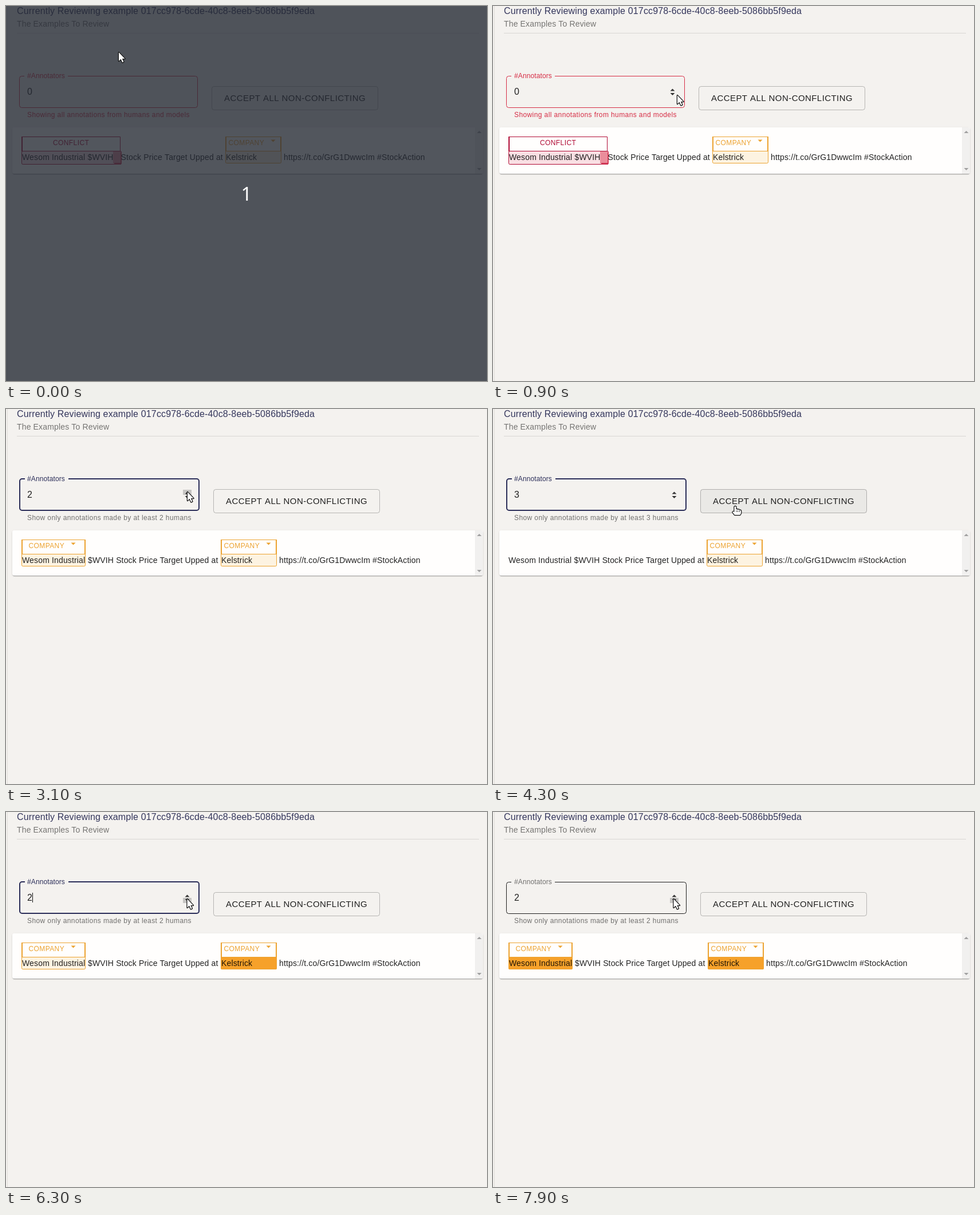
These frames come from a looping animation (840 by 655 pixels, 8000 ms). An HTML page with a canvas:

```html
<!DOCTYPE html>
<html lang="en">
<head>
<meta charset="utf-8">
<title>Annotation review</title>
<style>
html, body { margin: 0; width: 100%; height: 100%; overflow: hidden; background: #f4f2ef; }
canvas { display: block; }
</style>
</head>
<body>
<canvas id="stage" width="840" height="655"></canvas>
<script>
const ctx = document.getElementById('stage').getContext('2d');
const LOOP = 8000, STEP = 100;
const SANS = '"Liberation Sans", Arial, sans-serif';
const INK = 'rgba(0,0,0,.87)', GREY = 'rgba(0,0,0,.54)', LINE = 'rgba(0,0,0,.25)';
const RED = '#d62d45', CRIMSON = '#b00a34', NAVY = '#2b2e59', ORANGE = '#eca22f';

// time, x, y of the pointer tip
const PATH = [
  [0, 196, 80], [100, 196, 80], [900, 321, 155], [1100, 315, 150], [1300, 315, 150],
  [1500, 313, 147], [2100, 313, 147], [2300, 316, 144], [4200, 316, 144],
  [4300, 423, 169], [4400, 423, 169], [4500, 463, 165], [4600, 459, 163],
  [5100, 459, 163], [5600, 322, 155], [5700, 322, 155], [5800, 315.5, 151],
  [6400, 315.5, 151], [6800, 452, 166], [7300, 452, 166], [7900, 314.5, 151]
];
const CARETS = [1700, 2600, 3600, 6300];
const CLICKS = [4700, 6800];

const within = (v, a, b) => v >= a && v < b;
const easeOut = p => 1 - Math.pow(1 - p, 2.6);
const smooth = p => p * p * (3 - 2 * p);

function pointerAt(t) {
  let i = 0;
  while (i < PATH.length - 1 && PATH[i + 1][0] <= t) i++;
  const [t0, x0, y0] = PATH[i], [t1, x1, y1] = PATH[i + 1] || PATH[i];
  const p = t1 > t0 ? smooth((t - t0) / (t1 - t0)) : 0;
  return { x: x0 + (x1 - x0) * p, y: y0 + (y1 - y0) * p };
}

function sceneAt(t) {
  const value = t < 1800 ? 0 : t < 2600 ? 1 : t < 3600 ? 2 : t < 6300 ? 3 : 2;
  const right = value ? 338 : 335;
  const p = pointerAt(t);
  return {
    t, value, right, p,
    focus: within(t, 1700, 4800) || within(t, 6300, 6900),
    overInput: within(p.x, 23, right) && within(p.y, 122, 178),
    overButton: within(p.x, right + 24, right + 315) && within(p.y, 140, 182),
    caret: CARETS.some(c => within(t, c, c + 500)),
    spin: within(t, 1500, 4300) ? 'up' : within(t, 5800, 6500) || t >= 7800 ? 'down' : '',
    acceptedSecond: t >= 5100,
    acceptedFirst: t >= 7200
  };
}

function text(str, x, y, size, color, spacing = 0.15) {
  ctx.font = `${size}px ${SANS}`;
  ctx.letterSpacing = spacing + 'px';
  ctx.fillStyle = color;
  ctx.fillText(str, x, y);
}

function rect(x0, y0, x1, y1, color) {
  ctx.fillStyle = color;
  ctx.fillRect(x0, y0, x1 - x0, y1 - y0);
}

function roundPath(x0, y0, x1, y1, r) {
  ctx.beginPath();
  ctx.roundRect(x0, y0, x1 - x0, y1 - y0, r);
}

function outline(x0, y0, x1, y1, r, w, color) {
  roundPath(x0 + w / 2, y0 + w / 2, x1 - w / 2, y1 - w / 2, r);
  ctx.lineWidth = w;
  ctx.strokeStyle = color;
  ctx.stroke();
}

function triangle(cx, y, half, h, color) {
  ctx.beginPath();
  ctx.moveTo(cx - half, y);
  ctx.lineTo(cx + half, y);
  ctx.lineTo(cx, y + h);
  ctx.fillStyle = color;
  ctx.fill();
}

function header() {
  rect(0, 0, 840, 655, '#f4f2ef');
  rect(2, 0, 3, 655, '#e0deda');
  text('Currently Reviewing example 017cc978-6cde-40c8-8eeb-5086bb5f9eda', 19, 14, 16, '#34365c');
  text('The Examples To Review', 19, 36, 14, '#757472');
  rect(19, 47, 826, 48, '#d8d6d3');
}

function field(s) {
  const error = s.value === 0;
  const accent = error ? RED : s.focus ? NAVY : GREY;
  const border = error || s.focus ? accent : s.overInput ? INK : LINE;
  const w = s.focus ? 2 : 1;

  // the outline leaves a gap for the label
  ctx.save();
  ctx.beginPath();
  ctx.rect(0, 100, 840, 100);
  ctx.rect(31 + w, 118, 76, 8);
  ctx.clip('evenodd');
  outline(23, 123 - w, s.right, 178, 4, w, border);
  ctx.restore();

  text('#Annotators', 37, 126, 12, accent, 0.11);
  text(String(s.value), 37, 155, 16, INK);
  if (s.caret) rect(46, 141, 47, 158, '#111');
  if (s.overInput || s.focus) spinner(s.right - 29, s.spin);

  const help = error ? 'Showing all annotations from humans and models'
    : `Show only annotations made by at least ${s.value} humans`;
  text(help, 37, 194, 12, error ? RED : GREY, 0.4);
}

function spinner(x, lit) {
  if (lit === 'up') rect(x, 141, x + 15, 150, '#c6c5c3');
  if (lit === 'down') rect(x, 150, x + 15, 159, '#c6c5c3');
  triangle(x + 7.5, 148.5, 4, -4, '#333');
  triangle(x + 7.5, 152, 4, 4, '#333');
}

function button(s) {
  const x = s.right + 24;
  ctx.save();
  roundPath(x, 140, x + 291, 182, 4);
  ctx.clip();
  if (s.overButton) rect(x, 140, x + 291, 182, 'rgba(0,0,0,.04)');
  for (const c of CLICKS) ripple(s.t - c, pointerAt(c + 100));
  ctx.restore();
  outline(x, 140, x + 291, 182, 4, 1, LINE);
  text('ACCEPT ALL NON-CONFLICTING', x + 22, 166, 15, INK, 0.43);
}

function ripple(age, at) {
  if (!within(age, 100, 650)) return;
  const grow = easeOut(Math.min(age / 550, 1));
  const fade = Math.pow(1 - (age - 100) / 550, 1.8);
  ctx.fillStyle = `rgba(0,0,0,${(0.1 + 0.2 * grow) * 0.87 * fade})`;
  ctx.beginPath();
  ctx.arc(at.x, at.y, 196 * grow, 0, Math.PI * 2);
  ctx.fill();
}

function shadowed(x0, y0, x1, y1, dy, blur, alpha) {
  ctx.save();
  ctx.shadowColor = `rgba(0,0,0,${alpha})`;
  ctx.shadowOffsetY = dy;
  ctx.shadowBlur = blur;
  roundPath(x0, y0, x1, y1, 4);
  ctx.fillStyle = '#fff';
  ctx.fill();
  ctx.restore();
}

function card(bottom) {
  shadowed(11, 212, 833, bottom, 1, 3, 0.12);
  shadowed(11, 212, 833, bottom, 1, 1, 0.14);
  shadowed(12, 213, 832, bottom - 1, 2, 1, 0.2);
  roundPath(11, 212, 833, bottom, 4);
  ctx.fillStyle = '#fffefd';
  ctx.fill();
  rect(13, bottom, 831, bottom + 1, '#a3a2a1');
  roundPath(819, 212, 833, bottom, [0, 4, 4, 0]);
  ctx.fillStyle = '#f1f0ef';
  ctx.fill();
  triangle(826.5, 222, 4, -4, '#a0a0a0');
  triangle(826.5, bottom - 10, 4, 4, '#a0a0a0');
}

function companyTag(x0, x1, name, accepted) {
  const mid = (x0 + x1) / 2;
  roundPath(x0, 253, x1, 275, [0, 0, 2, 2]);
  ctx.fillStyle = accepted ? '#f6a12a' : '#fdf3e1';
  ctx.fill();
  outline(x0, 253, x1, 275, [0, 0, 2, 2], 1, ORANGE);
  rect(x0, 228, x1, 229, ORANGE);
  rect(x0, 228, x0 + 2, 254, ORANGE);
  rect(x1 - 2, 228, x1, 254, ORANGE);
  text('COMPANY', mid - 43.5, 243, 12, ORANGE, 0.4);
  triangle(mid + 34.5, 233.5, 4, 4, ORANGE);
  text(name, x0 + 1, 269, 14, INK);
}

function conflictTag() {
  roundPath(27, 253, 201, 277, 2);
  ctx.fillStyle = '#f9dfe3';
  ctx.fill();
  rect(187, 254, 201, 275, '#ea8d9b');
  outline(27, 253, 202, 277, 2, 1, CRIMSON);
  rect(189, 274, 201, 277, '#cf3453');
  rect(200, 256, 202, 275, '#d8405c');
  outline(27, 228, 200, 254, 0, 1, CRIMSON);
  rect(27, 228, 29, 254, CRIMSON);
  text('CONFLICT', 82, 243, 12, CRIMSON, 0.4);
}

function sentence(s) {
  const first = 'Wesom Industrial', ticker = '$WVIH', rest = 'Stock Price Target Upped at';
  const x = [383, 383, 375, 373][s.value];
  if (s.value < 2) {
    conflictTag();
    text(first, 28, 269, 14, INK);
    text(ticker, 142.5, 269, 14, INK);
    text(rest, 200.5, 269, 14, INK);
  } else {
    const left = s.value === 2 ? 28 : 27;
    if (s.value === 2) companyTag(27, 139, first, s.acceptedFirst);
    else text(first, left, 269, 14, INK);
    text(`${ticker} ${rest}`, s.value === 2 ? 143 : 141.5, 269, 14, INK);
  }
  companyTag(x, x + 98, 'Kelstrick', s.acceptedSecond);
  text('https://t.co/GrG1DwwcIm #StockAction', x + 102, 269, 14, INK);
}

function shape(d, x, y) {
  ctx.save();
  ctx.translate(x, y);
  const path = new Path2D(d);
  ctx.lineJoin = 'round';
  ctx.lineWidth = 2.4;
  ctx.strokeStyle = '#111';
  ctx.stroke(path);
  ctx.fillStyle = '#fff';
  ctx.fill(path);
  ctx.restore();
}

function pointer(s) {
  const { x, y } = s.p;
  if (!s.overButton) {
    shape('M1 1V16L4.6 12.8L7.2 18.6L9.4 17.6L6.9 12H11.5Z', x, y);
    return;
  }
  shape('M-1.5 9V2Q0 0 1.5 2V6.5Q3 5.5 4.3 7Q6 6 7.3 7.5Q10 7 10.2 9.5V13L8.5 16H-1L-4.5 11.5Q-4.5 9 -1.5 11Z', x, y);
  ctx.fillStyle = '#111';
  for (const k of [1.6, 4.3, 7]) ctx.fillRect(x + k, y + 8, 0.8, 3);
}

function countdown() {
  rect(0, 0, 840, 655, 'rgba(36,41,51,.79)');
  ctx.font = '33px "Noto Sans", "Open Sans", sans-serif';
  ctx.letterSpacing = '0px';
  ctx.textAlign = 'center';
  ctx.fillStyle = '#fff';
  ctx.fillText('1', 420, 339.5);
  ctx.textAlign = 'left';
}

function draw(t) {
  const s = sceneAt(t);
  header();
  field(s);
  button(s);
  card(s.value < 2 ? 293 : 291);
  sentence(s);
  if (t < 100) countdown();
  pointer(s);
}

const start = performance.now();
function tick() {
  const t = (performance.now() - start) % LOOP;
  draw(Math.floor(t / STEP) * STEP);
  requestAnimationFrame(tick);
}
tick();
</script>
</body>
</html>
```
